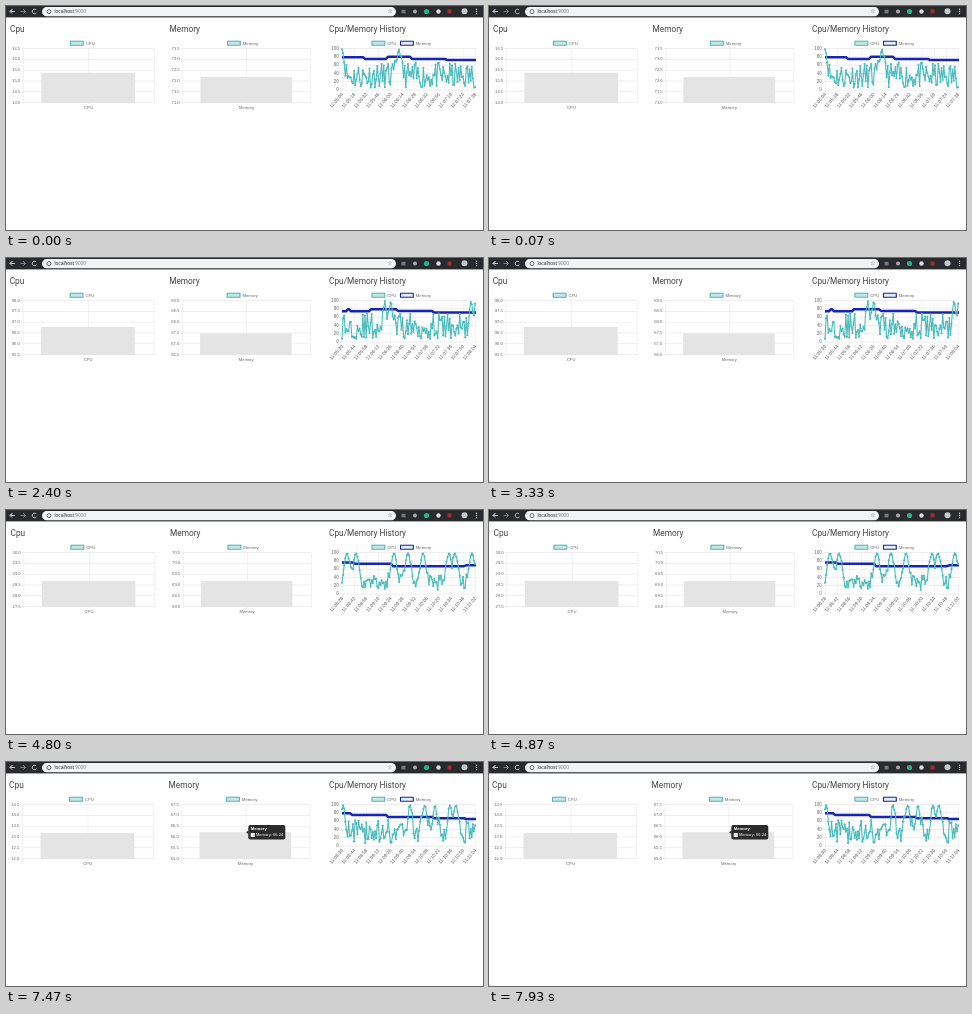
Recreate the animation shown at these times as an HTML page with a canvas. Size 477 by 224 pixels, loop 8 s.

```html
<!DOCTYPE html>
<html lang="en">
<head>
<meta charset="utf-8">
<title>Cpu and memory monitor</title>
<style>
html, body { margin: 0; width: 100%; height: 100%; overflow: hidden; background: #fff; }
canvas { display: block; width: 477px; height: 224px; }
</style>
</head>
<body>
<canvas id="stage" width="477" height="224"></canvas>
<script>
const canvas = document.getElementById('stage');
const ctx = canvas.getContext('2d');
const LOOP = 8000;
const TEAL = '#4bbcbd', BLUE = '#1423b8', GREY = '#666';
const LEFT = 336, RIGHT = 470;
const LABEL_FONT = '"Liberation Sans", Arial, sans-serif';
const TITLE_FONT = 'Roboto, "Liberation Sans", sans-serif';

// calm: usual load range in percent; peaks: x of bursts to full load.
// levels: [x, percent] where the memory line settles at a new level.
const scenes = [
  { start: 0, dx: 0, seed: 11, clock: '11:05:04', cpu: 15.4, memory: 72.2,
    calm: [6, 66], peaks: [336, 393], width: 3,
    levels: [[336, 79], [359, 75], [382, 80], [406, 75], [441, 72]] },
  { start: 2400, dx: -0.3, seed: 29, clock: '11:05:30', cpu: 96.8, memory: 67.5,
    calm: [8, 70], peaks: [379, 385, 465, 470], width: 2,
    levels: [[336, 74], [342, 79], [345, 74], [365, 79], [392, 75], [428, 71]] },
  { start: 4800, dx: 0.5, seed: 47, clock: '11:08:28', cpu: 28.7, memory: 69.2,
    calm: [8, 45], peaks: [341, 350, 388, 402, 417, 443, 449, 466], width: 4,
    levels: [[336, 76], [349, 73], [387, 67], [460, 69]] },
  { start: 7200, dx: -0.9, seed: 83, clock: '11:08:30', cpu: 13.2, memory: 66.24,
    calm: [7, 64], peaks: [337, 404, 419, 429, 444, 450], width: 3, tooltip: true,
    levels: [[336, 79], [346, 75], [382, 70], [428, 67], [460, 65]] }
];

function randomFrom(seed) {
  return () => (seed = (seed * 16807) % 2147483647) / 2147483647;
}

function text(string, x, y, size, color = GREY, align = 'left', font = LABEL_FONT, weight = 400) {
  ctx.font = `${weight} ${size}px ${font}`;
  ctx.fillStyle = color;
  ctx.textAlign = align;
  ctx.textBaseline = 'middle';
  ctx.fillText(string, x, y);
}

function title(string, x) {
  text(string, x, 23.9, 8.3, '#444', 'left', TITLE_FONT);
}

function rect(x, y, w, h, color) {
  ctx.fillStyle = color;
  ctx.fillRect(x, y, w, h);
}

function disc(x, y, r, color) {
  ctx.fillStyle = color;
  ctx.beginPath();
  ctx.arc(x, y, r, 0, 7);
  ctx.fill();
}

function ring(x, y, r, color, from = 0, to = 7) {
  ctx.strokeStyle = color;
  ctx.lineWidth = 0.9;
  ctx.beginPath();
  ctx.arc(x, y, r, from, to);
  ctx.stroke();
}

function roundBox(x, y, w, h, r, color) {
  ctx.fillStyle = color;
  ctx.beginPath();
  ctx.roundRect(x, y, w, h, r);
  ctx.fill();
}

function stroke(points, color, width) {
  ctx.strokeStyle = color;
  ctx.lineWidth = width;
  ctx.lineJoin = 'round';
  ctx.beginPath();
  points.forEach(([x, y]) => ctx.lineTo(x, y));
  ctx.stroke();
}

function legend(x, label, color = TEAL, fill = '#c9e5e4') {
  rect(x, 34.7, 13.5, 4.8, fill);
  ctx.strokeStyle = color;
  ctx.lineWidth = 1.1;
  ctx.strokeRect(x + 0.5, 35.2, 12.8, 4);
  text(label, x + 15.7, 37.4, 4.3);
}

function arrow(x, direction, color) {
  const tip = x + 2.5 * direction, barb = x + 0.3 * direction;
  stroke([[x - 2.5 * direction, 5.5], [tip, 5.5], [barb, 3.3], [tip, 5.5], [barb, 7.7]], color, 0.9);
}

function browserBar() {
  rect(0, 0, 477, 11.4, '#292a2d');
  roundBox(36, 1.1, 354, 9.2, 4.6, '#f1f3f4');
  arrow(6.5, -1, '#d5d5d5');
  arrow(17, 1, '#8a8a8a');
  ring(28.5, 5.5, 2.3, '#d5d5d5', 0.5, 5.6);
  ring(43, 5.6, 2, '#555');
  text('localhost', 48.5, 5.9, 4.9, '#333');
  text(':9000', 48.5 + ctx.measureText('localhost').width, 5.9, 4.9, '#888');
  text('☆', 384, 5.6, 6, '#555', 'center');
  rect(395.5, 3.8, 4, 3.6, '#77787b');
  disc(409, 5.5, 2, '#aaa');
  disc(420.5, 5.5, 2.6, '#22b58a');
  disc(432.5, 5.5, 2.2, '#ddd');
  rect(441.5, 3.5, 4, 4, '#a52b30');
  disc(458.5, 5.3, 3, '#c8c8cc');
  [3.2, 5.4, 7.6].forEach(y => disc(470.5, y, 0.7, '#ddd'));
}

function barChart(label, heading, middle, width, value) {
  const left = middle - width / 2, step = 10.8, base = 97;
  const bottom = Math.floor(value * 2 - 2) / 2;
  title(heading, left - 13);
  legend(middle - (label === 'CPU' ? 18.5 : 19.5), label);
  for (let i = 0; i < 6; i++) {
    const y = base - 0.5 - i * step;
    rect(left - 2, y - 0.3, width + 2, 0.7, '#e9e9e9');
    text((bottom + i / 2).toFixed(1), left - 2.8, y, 4.2, GREY, 'right');
  }
  [left, middle, left + width].forEach(x => rect(x, 42.5, 0.7, 55.5, '#ececec'));
  const height = (value - bottom) * 2 * step;
  rect(middle - width * 0.36, base - height, width * 0.715, height, '#e4e4e4');
  text(label, middle, 101.5, 4.2, GREY, 'center');
}

const percentY = percent => 84 - percent * 0.415;

function timeLabels(clock) {
  const [hour, minute, second] = clock.split(':').map(Number);
  for (let i = 0; i < 12; i++) {
    const x = LEFT + i * 12.1;
    const total = hour * 3600 + minute * 60 + second + i * 14;
    const stamp = [total / 3600, total / 60 % 60, total % 60]
      .map(part => String(Math.floor(part)).padStart(2, '0')).join(':');
    rect(x, 42.5, 0.6, 43.5, '#ededed');
    ctx.save();
    ctx.translate(x + 0.5, 87.5);
    ctx.rotate(-0.87);
    text(stamp, 0, 0, 4.8, '#5c5c5c', 'right');
    ctx.restore();
  }
}

function memoryLine(levels) {
  const points = levels.flatMap(([x, percent], i) => {
    const end = i + 1 < levels.length ? levels[i + 1][0] - 2 : RIGHT;
    return [[x, percentY(percent)], [end, percentY(percent)]];
  });
  stroke(points, BLUE, 2.5);
}

function cpuLine({ seed, calm: [low, high], peaks, width }) {
  const random = randomFrom(seed);
  const points = [];
  for (let x = LEFT; x <= RIGHT; x += 1.1) {
    const calm = low + (high - low) * random() ** 1.2;
    const distance = Math.min(...peaks.map(peak => Math.abs(x - peak)));
    const burst = Math.exp(-((distance / width) ** 2));
    points.push([x, percentY(calm + (98 - calm) * burst)]);
  }
  stroke(points, TEAL, 1.1);
  points.forEach(([x, y]) => disc(x, y, 1.05, TEAL));
}

function historyChart(scene) {
  title('Cpu/Memory History', 323);
  legend(365.5, 'CPU');
  legend(394, 'Memory', BLUE, '#e3eef2');
  for (let percent = 0; percent <= 100; percent += 20) {
    const y = percentY(percent);
    rect(LEFT - 2, y - 0.3, RIGHT - LEFT + 2, 0.7, '#e6e6e6');
    text(percent, LEFT - 3.3, y, 4.5, GREY, 'right');
  }
  timeLabels(scene.clock);
  memoryLine(scene.levels);
  cpuLine(scene);
}

function tooltip(value) {
  roundBox(243.2, 63, 37, 14.5, 2, '#2b2b2b');
  ctx.beginPath();
  ctx.moveTo(241, 70.2);
  ctx.lineTo(243.4, 68.2);
  ctx.lineTo(243.4, 72.2);
  ctx.fill();
  text('Memory', 245.6, 67, 4.2, '#fff', 'left', LABEL_FONT, 700);
  rect(245.6, 71, 4, 4, '#fff');
  rect(246.2, 71.6, 2.8, 2.8, '#e5e5e5');
  text(`Memory: ${value}`, 250.8, 73.2, 4.1, '#fff');
}

function draw(scene) {
  rect(0, 0, 477, 224, '#fff');
  browserBar();
  ctx.save();
  ctx.translate(scene.dx, 0);
  barChart('CPU', 'Cpu', 82.5, 131, scene.cpu);
  barChart('Memory', 'Memory', 240.5, 128, scene.memory);
  if (scene.tooltip) tooltip(scene.memory);
  ctx.restore();
  historyChart(scene);
}

let shown;
function frame() {
  const time = performance.now() % LOOP;
  const scene = scenes.findLast(({ start }) => start <= time);
  if (scene !== shown) draw(shown = scene);
  requestAnimationFrame(frame);
}
frame();
</script>
</body>
</html>
```
